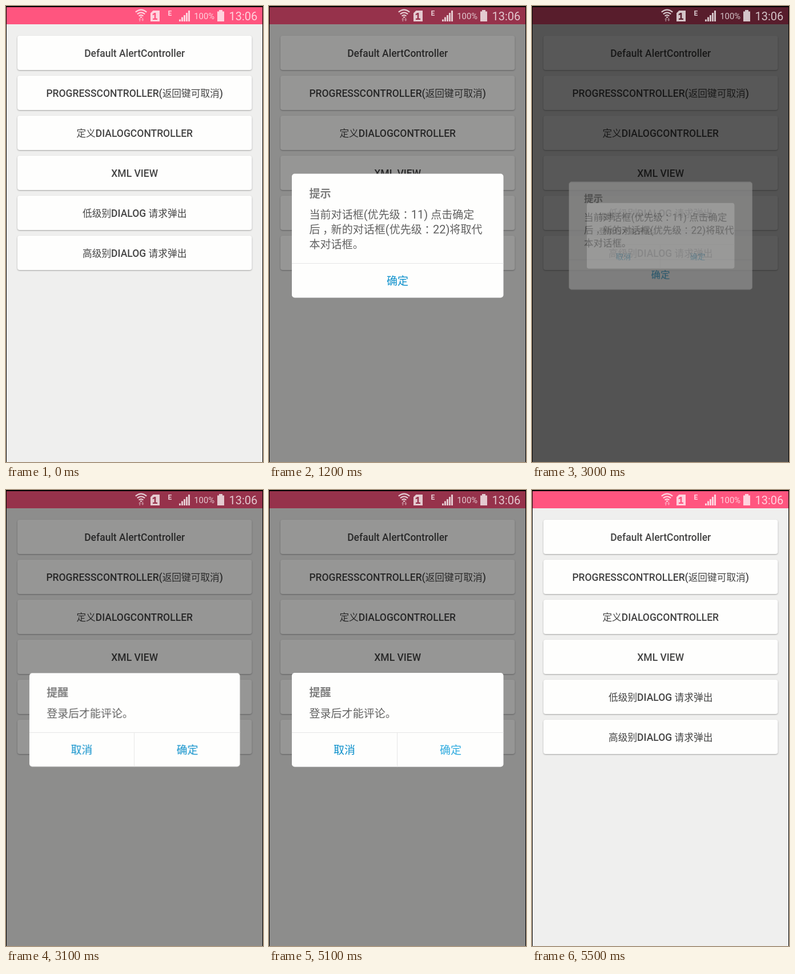
An HTML page that plays this animation: 450 by 798 pixels, repeating every 7.2 s.

```html
<!DOCTYPE html>
<html lang="zh-Hans">
<head>
<meta charset="utf-8">
<title>Dialog priority</title>
<style>
  html, body { margin: 0; width: 100%; height: 100%; overflow: hidden; background: #000; }
  svg { display: block; width: 450px; height: 798px; }
  text { font-family: Roboto, "Noto Sans CJK SC", "Noto Sans CJK", sans-serif; white-space: pre; }
  .cjk { font-family: "Noto Sans CJK SC", "Noto Sans CJK", sans-serif; font-weight: 400; }

  .card rect { fill: #fefefd; filter: drop-shadow(0 1px 1px rgba(0, 0, 0, .32)); }
  .card text { font-size: 17.5px; font-weight: 500; fill: #444; text-anchor: middle; }
  .card .cjk { font-size: 16.7px; }

  .dialog { transform-origin: 225px 402px; opacity: 0; }
  .dialog .panel { fill: #fefefd; }
  .dialog .rule { stroke: #e6e6e6; fill: none; }
  .dialog text { font-size: 20px; fill: #606060; }
  .dialog .cjk { font-size: 19.05px; }
  .dialog .title { fill: #7d7d7d; }
  .dialog .title .cjk { font-weight: 700; }
  .dialog .action { fill: #0a8fcb; text-anchor: middle; }

  .status { fill: #fff; opacity: .74; }
  .dim { opacity: 0; }

  .dim, .dialog, .press { animation: 7200ms step-end infinite; }
  #dim1 { animation-name: dim1; }
  #dim2 { animation-name: dim2; }
  #dialog1 { animation-name: dialog1; }
  #dialog2 { animation-name: dialog2; }
  #press1 { animation-name: press1; }
  #press2 { animation-name: press2; }

  @keyframes dim1 {
    0% { opacity: 0; }
    11.111% { opacity: .42; }
    12.5% { opacity: .41; }
    43.055%, 100% { opacity: 0; }
  }
  @keyframes dim2 {
    0% { opacity: 0; }
    41.666% { opacity: .41; }
    76.388%, 100% { opacity: 0; }
  }
  /* pop in with a small overshoot, shrink out */
  @keyframes dialog1 {
    0% { opacity: 0; transform: scale(.7); }
    11.111% { opacity: .2; transform: scale(.698); }
    12.5% { opacity: 1; transform: scale(.995); }
    13.888% { opacity: 1; transform: scale(.98); }
    15.277% { opacity: 1; transform: scale(1); }
    41.666% { opacity: .65; transform: scale(.867); }
    43.055%, 100% { opacity: 0; transform: scale(.6); }
  }
  @keyframes dialog2 {
    0% { opacity: 0; transform: scale(.7); }
    41.666% { opacity: .2; transform: scale(.698); }
    43.055% { opacity: 1; transform: scale(.995); }
    44.444% { opacity: 1; transform: scale(.98); }
    45.833% { opacity: 1; transform: scale(1); }
    75% { opacity: .65; transform: scale(.867); }
    76.388%, 100% { opacity: 0; transform: scale(.6); }
  }
  @keyframes press1 {
    0% { fill: #0a8fcb; }
    38.888% { fill: #2fabdf; }
    41.666%, 100% { fill: #0a8fcb; }
  }
  @keyframes press2 {
    0% { fill: #0a8fcb; }
    70.833% { fill: #2fabdf; }
    75%, 100% { fill: #0a8fcb; }
  }
</style>
</head>
<body>
<svg viewBox="0 0 450 798">
  <rect width="450" height="798" fill="#efefee"/>
  <rect width="450" height="32" fill="#ff557f"/>
  <g id="cards"></g>

  <rect id="dim1" class="dim" width="450" height="798"/>
  <g id="dialog1" class="dialog">
    <rect class="panel" x="40" y="293.5" width="370.5" height="217" rx="5"/>
    <path class="rule" d="M40 450.5H410.5"/>
    <text class="title" x="70.5" y="334.5">提示</text>
    <text x="70.5" y="372">当前对话框(优先级：11) 点击确定</text>
    <text x="70.5" y="398">后，新的对话框(优先级：22)将取代</text>
    <text x="70.5" y="424">本对话框。</text>
    <text id="press1" class="action press" x="225" y="488">确定</text>
  </g>

  <rect id="dim2" class="dim" width="450" height="798"/>
  <g id="dialog2" class="dialog">
    <rect class="panel" x="40" y="320" width="370.5" height="164.5" rx="5"/>
    <path class="rule" d="M40 424.5H410.5M224.5 424.5V484.5"/>
    <text class="title" x="70.5" y="361">提醒</text>
    <text x="70.5" y="398">登录后才能评论。</text>
    <text class="action" x="132" y="462">取消</text>
    <text id="press2" class="action press" x="318" y="462">确定</text>
  </g>

  <g class="status">
    <g fill="none" stroke="#fff" stroke-width="2.2">
      <path d="M226.8 10.6Q236.500 2.600 246.200 10.600"/>
      <path d="M229.800 14.200Q236.500 8.400 243.200 14.200"/>
      <path d="M232.700 17.600Q236.500 14.200 240.300 17.600"/>
    </g>
    <circle cx="236.5" cy="19.500" r="1.500"/>
    <path opacity=".55" d="M232 23.500l2.300-3 2.300 3h-1.400v3.500h-1.800v-3.500zM237 23.500h1.400v-3h1.800v3h1.400l-2.300 3.500z"/>
    <path fill-rule="evenodd" d="M257.500 8H269V27H253V12.500ZM260 12L256.800 14V16.200L259.700 15V21.800H257V24H265V21.800H262.300V12Z"/>
    <text x="283.500" y="16.500" font-size="12" font-weight="700">E</text>
    <path d="M303 27v-3.500h3V27zM307 27v-7.500h3V27zM311 27V16h3v11zM315 27V12h3v15zM319 27V8h3v19z"/>
    <text x="329.300" y="23" font-size="14.800">100%</text>
    <path d="M373 7h6v2.500h3V27h-12V9.500h3z"/>
    <text x="390.500" y="25" font-size="20">13:06</text>
  </g>

  <path d="M0 0H450V798H449V2H1V798H0Z"/>
</svg>
<script>
  const labels = [
    'Default AlertController',
    'PROGRESSCONTROLLER(返回键可取消)',
    '定义DIALOGCONTROLLER',
    'XML VIEW',
    '低级别DIALOG 请求弹出',
    '高级别DIALOG 请求弹出'
  ];
  document.getElementById('cards').innerHTML = labels.map((label, i) =>
    `<g class="card" transform="translate(0 ${i * 70})">
      <rect x="20" y="52" width="410.5" height="60" rx="4"/>
      <text x="225.2" y="89">${label}</text>
    </g>`).join('');

  // Chinese runs get their own size; full-width comma and colon sit mid-cell.
  const shift = c => (c === '，' || c === '：' ? 4.5 : 0);
  for (const el of document.querySelectorAll('text')) {
    const s = el.textContent;
    if (/[，：]/.test(s)) {
      el.setAttribute('dx', [...s].map((c, i) => shift(c) - shift(s[i - 1])).join(' '));
    }
    el.innerHTML = s.replace(/[\u3000-\u9fff\uff00-\uffef]+/g, '<tspan class="cjk">$&</tspan>');
  }
</script>
</body>
</html>
```
